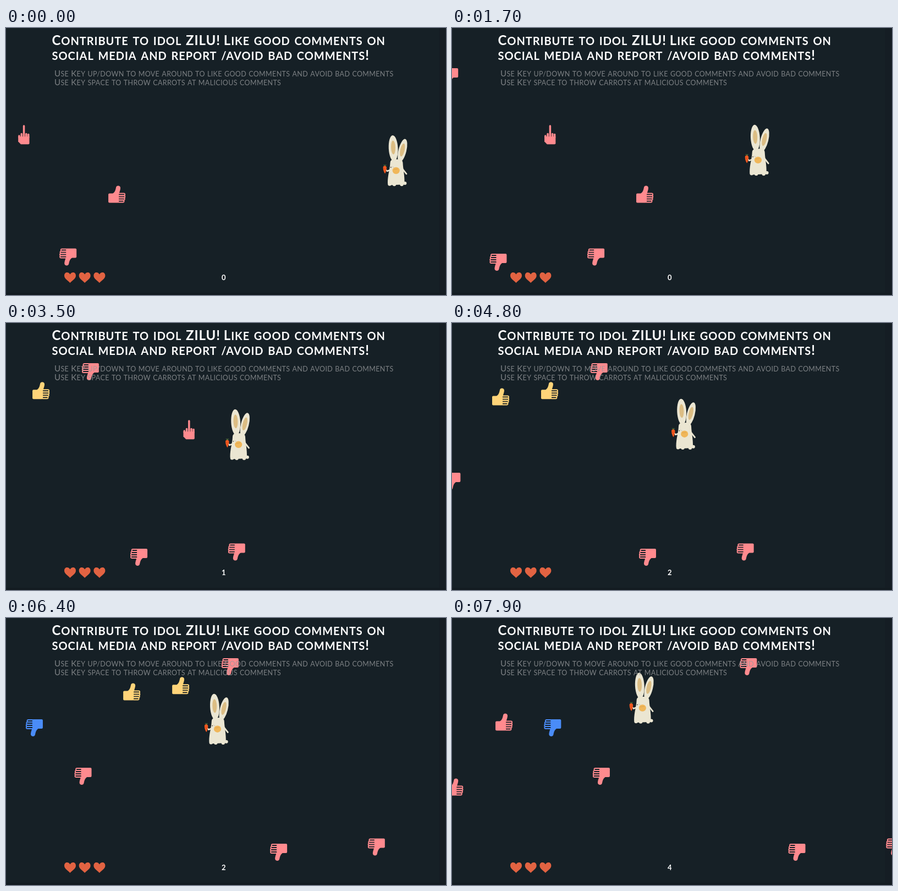
These frames come from a looping animation (800 by 485 pixels, 8 s). An HTML page with a canvas:

```html
<!DOCTYPE html>
<html lang="en">
<head>
<meta charset="utf-8">
<title>Carrot game</title>
<style>
html, body { margin: 0; width: 100%; height: 100%; overflow: hidden; background: #162026; }
canvas { display: block; }
</style>
</head>
<body>
<canvas id="stage" width="800" height="485"></canvas>
<script>
const ctx = document.getElementById('stage').getContext('2d');
const LOOP = 8000, TICK = 100, SPEED = 87.6, STEP = 19.1;
const CORAL = '#ff8a8e', YELLOW = '#ffd479', BLUE = '#4a8cf8', FUR = '#ebe6d2';

// x is the centre at time 0; end is the moment the hand is collected or hit
const hands = [
  { kind: 'finger', color: CORAL, x: 32.3, y: 194, speed: 85.8, end: 4.1 },
  { kind: 'up', color: CORAL, x: 201.6, y: 302, end: 2.3 },
  { kind: 'down', color: CORAL, x: 112.7, y: 416 },
  { kind: 'down', color: CORAL, x: -65, y: 425.5 },
  { kind: 'down', color: CORAL, x: -153.2, y: 88.5 },
  { kind: 'up', color: YELLOW, x: -243, y: 122.7, end: 6.7 },
  { kind: 'up', color: YELLOW, x: -332, y: 134, end: 7.5 },
  { kind: 'down', color: CORAL, x: -420.6, y: 287.5 },
  { kind: 'down', color: BLUE, x: -509.2, y: 199.5 },
  { kind: 'up', color: CORAL, x: -597.5, y: 189 },
  { kind: 'up', color: CORAL, x: -687.2, y: 307 }
];

// key presses: time, steps to the left, steps down
const moves = [
  [0, 0, 0], [.6, 1, 0], [1.1, 2, -1], [1.2, 3, -1], [1.3, 4, -1], [1.4, 5, -1],
  [1.5, 6, -1], [1.6, 7, -1], [1.7, 8, -1], [1.8, 10, -1], [1.9, 11, -1],
  [2, 12, -1], [2.1, 13, -1], [2.2, 14, -1], [2.3, 15, 0], [3, 15, -1],
  [3.2, 15, -2], [4.4, 15, -3], [5.6, 16, -3], [6, 17, -3], [6.6, 17, -4],
  [7, 18, -4], [7.3, 18, -5], [7.5, 19, -5]
];

function box(x, y, w, h, r) {
  ctx.beginPath();
  ctx.roundRect(x, y, w, h, r);
}

function oval(x, y, rx, ry, deg, color) {
  ctx.fillStyle = color;
  ctx.beginPath();
  ctx.ellipse(x, y, rx, ry, deg * Math.PI / 180, 0, 7);
  ctx.fill();
}

function line(x1, y1, x2, y2, width, color) {
  ctx.strokeStyle = color;
  ctx.lineWidth = width;
  ctx.lineCap = 'round';
  ctx.beginPath();
  ctx.moveTo(x1, y1);
  ctx.lineTo(x2, y2);
  ctx.stroke();
}

function thumb(color) {
  ctx.translate(-15.5, -15.5);
  ctx.fillStyle = ctx.strokeStyle = color;
  box(0, 14, 19, 17, 2);
  ctx.fill();
  ctx.beginPath();
  ctx.moveTo(7, 15);
  ctx.bezierCurveTo(12, 12, 13, 8, 14, 3);
  ctx.bezierCurveTo(15, -1.5, 22, -.5, 22, 4);
  ctx.bezierCurveTo(22, 8, 20, 11, 19.5, 15);
  ctx.fill();
  ctx.lineWidth = 1.9;
  for (let i = 0; i < 4; i++) {
    box(17, 14 + 4 * i, [13, 13.1, 12.6, 11.4][i], 4, 1.8);
    ctx.stroke();
  }
}

function finger(color) {
  ctx.translate(-10.3, -17.8);
  ctx.fillStyle = color;
  for (const [x, y] of [[.2, 18], [4.5, 14.5], [8.8, 0], [13, 14.5], [17, 15.5]]) {
    box(x, y, 3.5, 24 - y, 1.7);
    ctx.fill();
  }
  ctx.beginPath();
  ctx.moveTo(.2, 21);
  ctx.lineTo(20.5, 21);
  ctx.lineTo(20.5, 33);
  ctx.quadraticCurveTo(20.5, 35, 18.5, 35);
  ctx.lineTo(5, 35);
  ctx.lineTo(.2, 30);
  ctx.fill();
}

function hand(h, t) {
  if (t >= (h.end ?? 9)) return;
  ctx.save();
  ctx.translate(h.x + (h.speed ?? SPEED) * t, h.y);
  if (h.kind === 'down') ctx.rotate(Math.PI);
  (h.kind === 'finger' ? finger : thumb)(h.color);
  ctx.restore();
}

function carrot() {
  for (const dx of [-2, 0, 2]) line(4, 57, 4 + dx, 53.5, 1, '#55743c');
  ctx.fillStyle = '#f4581f';
  ctx.beginPath();
  ctx.moveTo(.6, 58);
  ctx.bezierCurveTo(1, 54.5, 7, 55, 7, 58.5);
  ctx.bezierCurveTo(7, 63, 5.5, 67, 4.2, 69.5);
  ctx.bezierCurveTo(2, 67, .4, 62, .6, 58);
  ctx.fill();
  line(2, 60.5, 4, 61, .6, '#b83a12');
  line(4, 64, 5.5, 63.6, .6, '#b83a12');
}

function bunny(t) {
  const [, left, down] = moves.findLast(m => m[0] <= t + .001);
  ctx.save();
  ctx.translate(685 - left * STEP, 195 + down * STEP);
  oval(19.2, 23.5, 8.4, 23.6, -3, FUR);
  oval(35.8, 27.5, 7.2, 21.5, 14, FUR);
  oval(19, 22, 4, 12.5, -2, '#dcbd83');
  oval(35.8, 26.5, 3.9, 12, 13, '#dcbd83');
  line(16, 62, 8, 65, 2.6, FUR);
  line(8, 65, 6.5, 63, 2, FUR);
  line(36, 61, 43, 70, 2.8, FUR);
  ctx.fillStyle = FUR;
  ctx.beginPath();
  ctx.moveTo(13.5, 50);
  ctx.bezierCurveTo(14, 43, 20, 43, 25, 43.5);
  ctx.bezierCurveTo(32, 43, 36, 44, 36.5, 50);
  ctx.bezierCurveTo(37, 62, 40, 72, 39.5, 88);
  ctx.quadraticCurveTo(38, 91, 34, 89.5);
  ctx.lineTo(13, 90.5);
  ctx.quadraticCurveTo(9, 90.5, 9, 86);
  ctx.bezierCurveTo(9, 72, 13, 62, 13.5, 50);
  ctx.fill();
  for (const [x, y] of [[12.5, 88.7], [21, 89.3], [34.5, 89.3], [40.2, 87]]) oval(x, y, 3.2, 3, 0, FUR);
  oval(24.2, 64, 6.6, 6.2, 0, '#f0b75a');
  line(20.5, 62, 27, 61, .5, '#c98f3c');
  oval(14.8, 58, .9, .9, 0, '#4a443a');
  line(17, 57, 20, 58, .6, '#b9b19c');
  carrot();
  ctx.restore();
}

function heart(x, y) {
  ctx.fillStyle = '#e26342';
  ctx.beginPath();
  for (const s of [-1, 1]) {
    ctx.moveTo(x, y + 3.4);
    ctx.bezierCurveTo(x + 3 * s, y - 1.8, x + 10.5 * s, y - 1, x + 10.5 * s, y + 6);
    ctx.bezierCurveTo(x + 10.5 * s, y + 11.5, x + 3.5 * s, y + 15, x, y + 19);
  }
  ctx.fill();
}

// capitals at full size, the other letters as smaller capitals
function caps(text, x, y, weight, big, small, gap, wordGap) {
  ctx.letterSpacing = gap + 'px';
  ctx.wordSpacing = wordGap + 'px';
  for (const run of text.match(/[A-Z!]+|[^A-Z!]+/g)) {
    const size = /[A-Z!]/.test(run) ? big : small;
    ctx.font = `${weight} ${size}px Lato, "Open Sans", sans-serif`;
    const upper = run.toUpperCase();
    ctx.fillText(upper, x, y);
    x += ctx.measureText(upper).width;
  }
}

function labels(t) {
  ctx.textAlign = 'left';
  ctx.fillStyle = '#fff';
  caps('Contribute to idol ZILU! Like good comments on', 83.5, 31, 700, 24, 20, .95, 1.9);
  caps('social media and report /avoid bad comments!', 83.5, 58, 700, 24, 20, .95, 1.9);
  ctx.fillStyle = 'rgba(150,152,155,.8)';
  caps('Use Key up/down to move around to like good comments and avoid bad comments', 88, 88, 400, 15, 12.5, .36, .6);
  caps('Use Key space to throw carrots at malicious comments', 88, 104, 400, 15, 12.5, .36, .6);

  const score = [2.3, 4.1, 6.7, 7.5].filter(s => t >= s).length;
  ctx.letterSpacing = ctx.wordSpacing = '0px';
  ctx.font = '700 13px Lato, "Open Sans", sans-serif';
  ctx.textAlign = 'center';
  ctx.fillStyle = '#fff';
  ctx.fillText(score, 395.8, 457.6);
}

function draw(now) {
  const t = Math.floor(now % LOOP / TICK) * TICK / 1000;
  ctx.fillStyle = '#162026';
  ctx.fillRect(0, 0, 800, 485);
  ctx.fillStyle = '#151d24';
  ctx.fillRect(787, 0, 13, 485);
  ctx.fillStyle = '#131b21';
  ctx.fillRect(0, 481, 800, 4);
  for (const h of hands) hand(h, t);
  bunny(t);
  for (const x of [116.5, 143.2, 169.9]) heart(x, 444);
  labels(t);
}

const start = performance.now();
function loop() {
  draw(performance.now() - start);
  requestAnimationFrame(loop);
}
loop();
</script>
</body>
</html>
```
